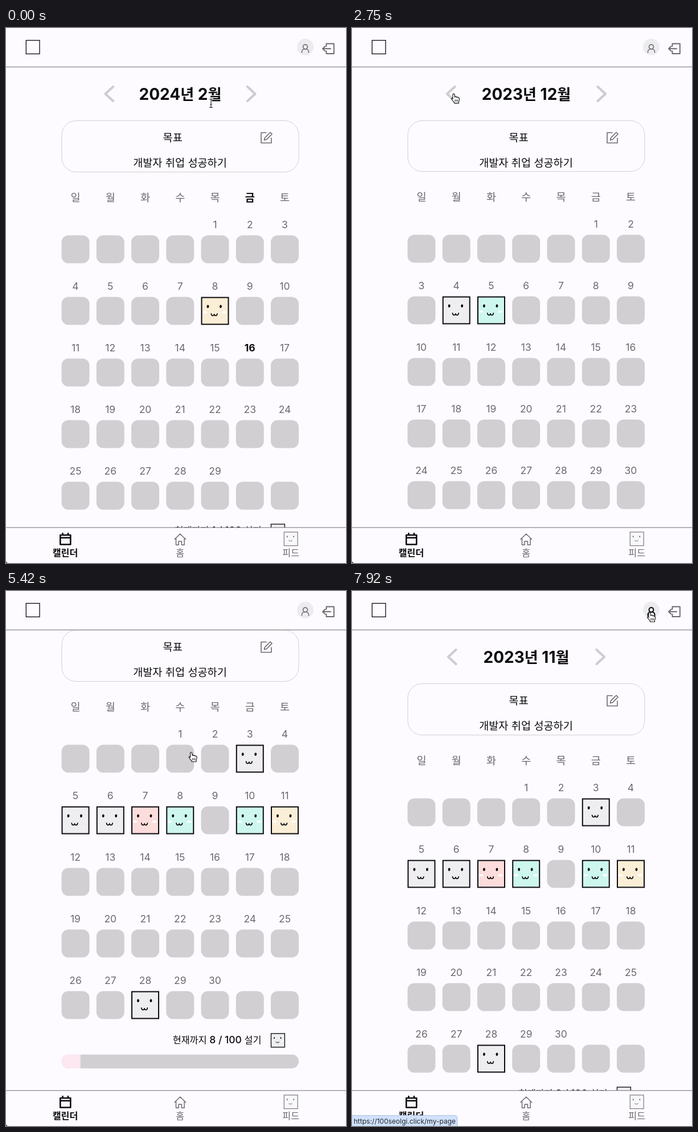
Recreate the animation shown at these times as an HTML page. Size 597 by 938 pixels, loop 8 s.

```html
<!DOCTYPE html>
<html lang="ko">
<head>
<meta charset="utf-8">
<style>
html, body { margin: 0; width: 100%; height: 100%; overflow: hidden; background: #fdfbff; }
svg { display: block; width: 597px; height: 938px; }
text { font-family: Inter, "Noto Sans CJK KR", "Noto Sans CJK", sans-serif; text-anchor: middle; }
.ko { font-size: .93em; }
.line { fill: none; stroke-linecap: round; stroke-linejoin: round; }
</style>
</head>
<body>
<svg id="stage" viewBox="0 0 597 938"></svg>
<script>
const LOOP = 8000;
const INK = '#0b0a0d', GRAY = '#6b696d', CELL = '#d1cfd2', BG = '#fdfbff';
const FILL = { gray: '#eeedf0', cream: '#fbeed7', mint: '#cdf7ee', pink: '#fddcdc' };
const WEEK = [...'일월화수목금토'];
const MONTHS = [
  { from: 0, title: '2024년 2월', half: 73, first: 4, days: 29, today: 16, marks: { 8: 'cream' } },
  { from: 1580, title: '2024년 1월', half: 71.5, first: 1, days: 31, marks: { 1: 'mint' } },
  { from: 2500, title: '2023년 12월', half: 80.5, first: 5, days: 31, marks: { 4: 'gray', 5: 'mint' } },
  { from: 3500, title: '2023년 11월', half: 78.5, first: 3, days: 30,
    marks: { 3: 'gray', 5: 'gray', 6: 'gray', 7: 'pink', 8: 'mint', 10: 'mint', 11: 'cream', 28: 'gray' } }
];

const text = (x, y, size, str, fill = INK, weight = 400, extra = '') =>
  `<text x="${x}" y="${y}" font-size="${size}" fill="${fill}" font-weight="${weight}" ${extra}>` +
  str.replace(/[가-힣]+/g, s => `<tspan class="ko">${s}</tspan>`) + '</text>';
const rect = (x, y, w, h, r, fill, extra = '') =>
  `<rect x="${x}" y="${y}" width="${w}" height="${h}" rx="${r}" fill="${fill}" ${extra}/>`;
const line = (d, color, width, extra = '') =>
  `<path class="line" d="${d}" stroke="${color}" stroke-width="${width}" ${extra}/>`;
const oval = (x, y, rx, ry, fill) => `<ellipse cx="${x}" cy="${y}" rx="${rx}" ry="${ry}" fill="${fill}"/>`;

// Face sticker drawn on a 49-unit square.
function sticker(x, y, fill, { scale = 1, color = INK, border = 2, blush = true } = {}) {
  return `<g transform="translate(${x} ${y}) scale(${scale})">` +
    rect(border / 2, border / 2, 49 - border, 49 - border, 0, fill, `stroke="${color}" stroke-width="${border}"`) +
    (blush ? oval(6.5, 26.7, 4, 2, '#fff') + oval(40.5, 26.7, 4, 2, '#fff') : '') +
    oval(12, 16.7, 1.9, 2.8, color) + oval(34.5, 16.7, 1.9, 2.8, color) +
    line('M17.8 29.3q.4 3.6 2.8 3.6q2.2 0 2.5-2.7q.3 2.7 2.5 2.7q2.4 0 2.8-3.6', color, 1.6) + '</g>';
}

function monthView(m) {
  const rows = Math.ceil((m.first + m.days) / 7);
  const lift = rows > 5 ? 1 : 0;
  const count = Object.keys(m.marks).length;
  const end = (rows - 5) * 108 - lift;
  const colX = i => 122 + i * 61.25;
  let s = text(306, 126, 28, m.title, INK, 700);
  s += line(`M${306 - m.half - 45} 103l-13.5 12.5l13.5 12.5`, '#cecccf', 4.3, 'stroke-linecap="butt"');
  s += line(`M${306 + m.half + 45} 103l13.5 12.5l-13.5 12.5`, '#cecccf', 4.3);
  s += rect(98, 162.5, 416, 90 - lift, 25, 'none', 'stroke="#d1cfd2"');
  s += text(292.7, 199, 20, '목표', INK, 500) + text(305.5, 243.3, 20, '개발자 취업 성공하기', INK, 500);
  s += line('M457 183.5H448V201.500H466V193M453.500 196.500L454.500 192.500L464 183L467 186L457.500 195.500Z', GRAY, 1.6);
  WEEK.forEach((d, i) => {
    const on = m.today && i === 5;
    s += text(colX(i), 304 - lift, 20, d, on ? INK : GRAY, on ? 700 : 400);
  });
  for (let i = 0; i < rows * 7; i++) {
    const day = i - m.first + 1, x = colX(i % 7), y = 363.5 - lift + Math.floor(i / 7) * 108;
    const mark = m.marks[day];
    if (day > 0 && day <= m.days) {
      const on = day === m.today;
      s += text(x, y - 12.5, 17.5, String(day), on ? INK : GRAY, on ? 700 : 400);
    }
    s += mark ? sticker(x - 24.5, y, FILL[mark], { blush: mark !== 'gray' })
              : rect(x - 24.5, y, 49, 49, 12, CELL);
  }
  s += `<g transform="translate(0 ${end})">` +
    text(448.5, 887.3, 17.5, `현재까지 ${count} / 100 설기`, INK, 500, 'style="text-anchor:end"') +
    sticker(464.800, 869.2, FILL.gray, { scale: .515, border: 2.6 }) +
    `<clipPath id="bar${m.from}">${rect(97.5, 906.5, 416.5, 24.5, 12.2, '#000')}</clipPath>` +
    `<g clip-path="url(#bar${m.from})">` + rect(97.5, 906.5, 416.5, 24.5, 0, CELL) +
    rect(97.5, 906.5, 4.165 * count, 24.5, 0, '#fde7f1') + '</g></g>';
  return `<g class="month">${s}</g>`;
}

function header() {
  return rect(0, 0, 597, 68, 0, BG) + rect(0, 67.7, 597, 1.1, 0, '#7b797d') +
    rect(35.3, 21.6, 23.7, 23.8, 0, BG, `stroke="${INK}" stroke-width="1.3"`) +
    `<circle cx="525.5" cy="33.3" r="14.5" fill="#ecebee"/>` +
    line('M519.5 43v-1.5a4.500 4.500 0 0 1 4.500-4.500h3a4.500 4.500 0 0 1 4.500 4.500V43M525.5 37a4 4 0 1 1 .01 0', GRAY, 1.5, 'id="person"') +
    line('M562.5 32V27.500H575.800V45H562.500V40.500M570 36.300H556.500M560.500 32L556 36.300L560.500 40.600', GRAY, 1.9, 'id="exit"');
}

function navBar() {
  return rect(0, 876, 597, 62, 0, BG) + rect(0, 875.3, 597, 1.1, 0, '#7b797d') +
    line('M95.300 889H113.300V905.500H95.300ZM95.300 893.800H113.300M99.500 886V889M109 886V889', INK, 2.6) +
    text(104, 926, 17.4, '캘린더', INK, 700) +
    line('M296 896.500L305.800 887L315.600 896.500M298.500 895V906.300H303.200V900H308.400V906.300H313.100V895', GRAY, 1.5) +
    text(305.700, 926, 17.4, '홈', GRAY) +
    sticker(487.700, 883.2, '#f8f7fa', { scale: .51, color: '#747276', border: 2.2 }) +
    text(500.2, 926, 17.4, '피드', GRAY) +
    `<path d="M0 934.500Q.5 937.500 3.500 938H0Z" fill="#222"/>`;
}

const urlTip = `<g id="tip"><path d="M-2 919.500H180Q185 919.500 185 924.500V940H-2Z" fill="#d0e1fc" stroke="#adbfdc"/>` +
  text(3, 934, 12, 'https://100seolgi.click/my-page', '#24272c', 400, 'style="text-anchor:start"') + '</g>';

const cursors = {
  hand: `<path d="M-1.700 9V1.500Q-1.700 0 -.3 0Q1.200 0 1.400 1.500L2 6Q2.300 4.500 3.600 4.800Q4.800 5 4.900 6.300Q5.500 5.200 6.800 5.700Q7.800 6.100 7.800 7.200Q9.500 6.600 9.800 8.300Q10 11.500 8.700 13.700V16.500H.8V15Q-1.500 12.800 -3.600 9.700Q-4.700 8.200 -3.500 7.600Q-2.600 7.300 -1.700 9Z" fill="#fff" stroke="#111" stroke-width="1.15" stroke-linejoin="round"/>` +
    line('M2.300 10.500V13.500M4.500 10.500V13.500M6.700 10.500V13.500', '#111', .9),
  arrow: `<path d="M0 0V13.200L3 10.400L5 15.200L7.300 14.200L5.300 9.600H9.500Z" fill="#111" stroke="#fff" stroke-width="1.100"/>`,
  beam: line('M-2.500-7.500Q0-7.500 0-5.500Q0-7.500 2.500-7.500M0-5.500V5.500M-2.500 7.500Q0 7.500 0 5.500Q0 7.500 2.500 7.500M-1.500 2H1.500', '#fff', 3) +
    line('M-2.500-7.500Q0-7.500 0-5.500Q0-7.500 2.500-7.500M0-5.500V5.500M-2.500 7.500Q0 7.500 0 5.500Q0 7.500 2.500 7.500M-1.500 2H1.500', '#222', 1.1)
};

const stage = document.getElementById('stage');
stage.innerHTML = rect(0, 0, 597, 938, 0, BG) +
  `<g id="page">${MONTHS.map(monthView).join('')}</g>` + header() + navBar() + urlTip +
  '<g id="cursor">' + Object.entries(cursors).map(([k, v]) => `<g id="${k}">${v}</g>`).join('') + '</g>';

const el = id => document.getElementById(id);
const months = [...document.querySelectorAll('.month')];
const show = (node, on) => node.setAttribute('display', on ? 'inline' : 'none');

const clamp = v => Math.min(1, Math.max(0, v));
const smooth = p => p * p * (3 - 2 * p);
const easeOut = p => 1 - (1 - p) ** 3;
const span = (t, a, b) => clamp((t - a) / (b - a));

// Each move: start, end, destination.
const START = [360, 132];
const MOVES = [
  [80, 580, [178.7, 115.3]],
  [4000, 4250, [325.3, 282.8]],
  [6080, 6500, [529.3, 46]],
  [6580, 6830, [564, 35]],
  [7170, 7420, [522.7, 37.5]]
];

function pointer(t) {
  let [x, y] = START;
  for (const [a, b, to] of MOVES) {
    const p = smooth(span(t, a, b));
    x += (to[0] - x) * p;
    y += (to[1] - y) * p;
  }
  return [x, y];
}

function cursorKind(t, x) {
  if (t < 580) return x > 232 ? 'beam' : x > 192 ? 'arrow' : 'hand';
  if (t > 4040 && t < 4180) return 'arrow';
  if (t > 6120 && t < 6640) return 'arrow';
  if (t > 6640 && x > 541 && x < 554) return 'arrow';
  return 'hand';
}

function render(t) {
  const current = MONTHS.filter(m => t >= m.from).length - 1;
  months.forEach((g, i) => show(g, i === current));

  const scroll = 94 * (easeOut(span(t, 4250, 4600)) - easeOut(span(t, 5750, 6170)));
  el('page').setAttribute('transform', `translate(0 ${-scroll})`);

  const [x, y] = pointer(t);
  const kind = cursorKind(t, x);
  el('cursor').setAttribute('transform', `translate(${x} ${y})`);
  for (const k in cursors) show(el(k), k === kind);

  const onPerson = t > 7170 && x < 540;
  el('person').setAttribute('stroke', onPerson ? INK : GRAY);
  el('person').setAttribute('stroke-width', onPerson ? 2 : 1.5);
  el('exit').setAttribute('stroke', t > 6640 && x > 554 ? INK : GRAY);
  show(el('tip'), t >= 7500);
}

const began = performance.now();
function tick() {
  render((performance.now() - began) % LOOP);
  requestAnimationFrame(tick);
}
tick();
</script>
</body>
</html>
```
